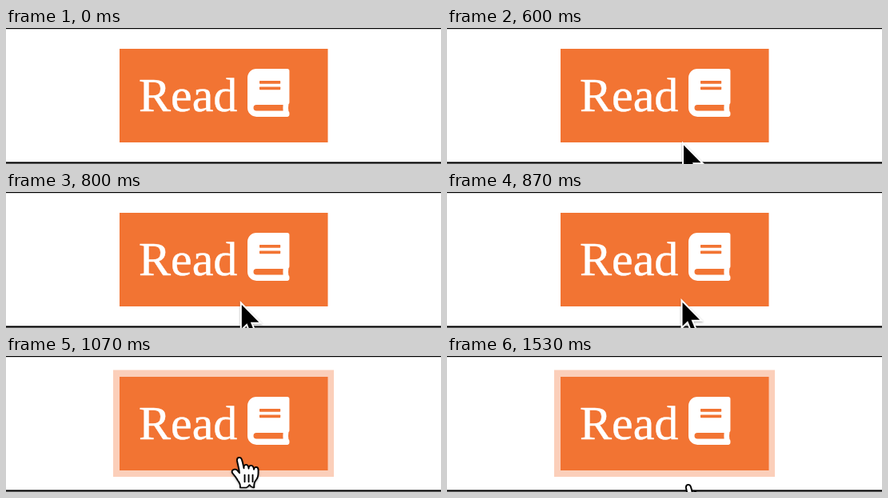
Write an HTML page that moves like this. It is 544 by 170 pixels and loops after 1.59 s.

```html
<!DOCTYPE html>
<html lang="en">
<head>
<meta charset="utf-8">
<title>Read button</title>
<style>
  html, body { margin: 0; width: 100%; height: 100%; overflow: hidden; background: #fff; }
  svg { display: block; width: 544px; height: 170px; }
  text { font: 60px "Liberation Serif", Times, serif; fill: #fff; stroke: #fff; stroke-width: .5; }
  .cursor { filter: drop-shadow(0 1px 1px rgba(0, 0, 0, .35)); }
</style>
</head>
<body>
<svg viewBox="0 0 544 170">
  <rect width="544" height="170" fill="#fff"/>
  <rect width="544" height="1.2"/>
  <rect y="167.4" width="544" height="2.2"/>

  <rect id="ring" x="134" y="17.5" width="276" height="133.5" fill="#fbcfba"/>
  <rect x="142" y="26" width="260.5" height="117" fill="#f27433"/>
  <text x="166" y="104">Read</text>

  <g transform="translate(302 51) scale(.117)">
    <path fill="#fff" d="M96 0H424Q448 0 448 24V360Q448 371 439 379Q433 416 439 453Q448 460 448 472V488Q448 512 424 512H96A96 96 0 0 1 0 416V96A96 96 0 0 1 96 0Z"/>
    <path fill="#f27433" d="M96 384H381Q378 416 381 448H96A32 32 0 0 1 96 384Z"/>
    <rect x="128" y="128" width="224" height="32" rx="6" fill="#f27433"/>
    <rect x="128" y="192" width="224" height="32" rx="6" fill="#f27433"/>
  </g>

  <g class="cursor">
    <path id="arrow" stroke="#fff" stroke-width="4" paint-order="stroke"
      d="M0 0V29.5L6.6 23.2L11 34L15.4 32.2L11 21.8H21.5Z"/>
    <g id="hand">
      <g transform="scale(2.5 2.3)" fill="#fff" stroke="#000" stroke-width=".75" stroke-linejoin="round" stroke-linecap="round">
        <path d="M-.9 12.3C-1.6 10.8-2.6 9.6-3.6 8.3C-4.2 7-2.6 5.7-1.2 6.8L0 8.4C-.2 5.8-.9 3.6-1.2 1.7C-1.4-.4 .6-.6 1.1 1C1.7 2.8 1.9 4.4 2.2 5.8C1.9 3.3 4.4 3.1 4.6 6C4.6 3.6 7 3.6 7.2 6.5C7.4 4.7 9.3 4.6 9.4 6.6V8.4C9.4 11 8.7 11.8 8 12.6C7.2 13.6 7.2 14.6 7.3 16.2C6 16.5 5.6 15.6 5 14.8C4.4 15.6 4 16.2 3.4 16.3H.4C.6 14-.3 13.4-.9 12.3Z"/>
        <path fill="none" d="M2.6 9.4V13.2M4.6 9.4V13.2M6.6 9.4V13.1"/>
      </g>
    </g>
  </g>
</svg>
<script>
  const LOOP = 1590;
  const byId = id => document.getElementById(id);
  const ring = byId("ring"), arrow = byId("arrow"), hand = byId("hand");

  // Pointer poses, held until the next start time.
  const poses = [
    { at: 0 },
    { at: 470, shape: arrow, x: 299, y: 169.5 },
    { at: 530, shape: arrow, x: 297, y: 155 },
    { at: 600, shape: arrow, x: 296, y: 146.5 },
    { at: 670, shape: arrow, x: 295.5, y: 144 },
    { at: 730, shape: arrow, x: 295, y: 142.5 },
    { at: 800, shape: arrow, x: 294.8, y: 141 },
    { at: 870, shape: arrow, x: 294.5, y: 138 },
    { at: 930, shape: hand, x: 292, y: 127 },
    { at: 1470, shape: hand, x: 294, y: 133 },
    { at: 1530, shape: hand, x: 302, y: 161 }
  ];

  const show = (node, on) => node.setAttribute("visibility", on ? "visible" : "hidden");

  function render(time) {
    const pose = poses.findLast(p => p.at <= time);
    show(ring, time >= 1070);
    for (const shape of [arrow, hand]) show(shape, pose.shape === shape);
    if (pose.shape) pose.shape.setAttribute("transform", `translate(${pose.x} ${pose.y})`);
  }

  const start = performance.now();
  function tick() {
    render((performance.now() - start) % LOOP);
    requestAnimationFrame(tick);
  }
  tick();
</script>
</body>
</html>
```
